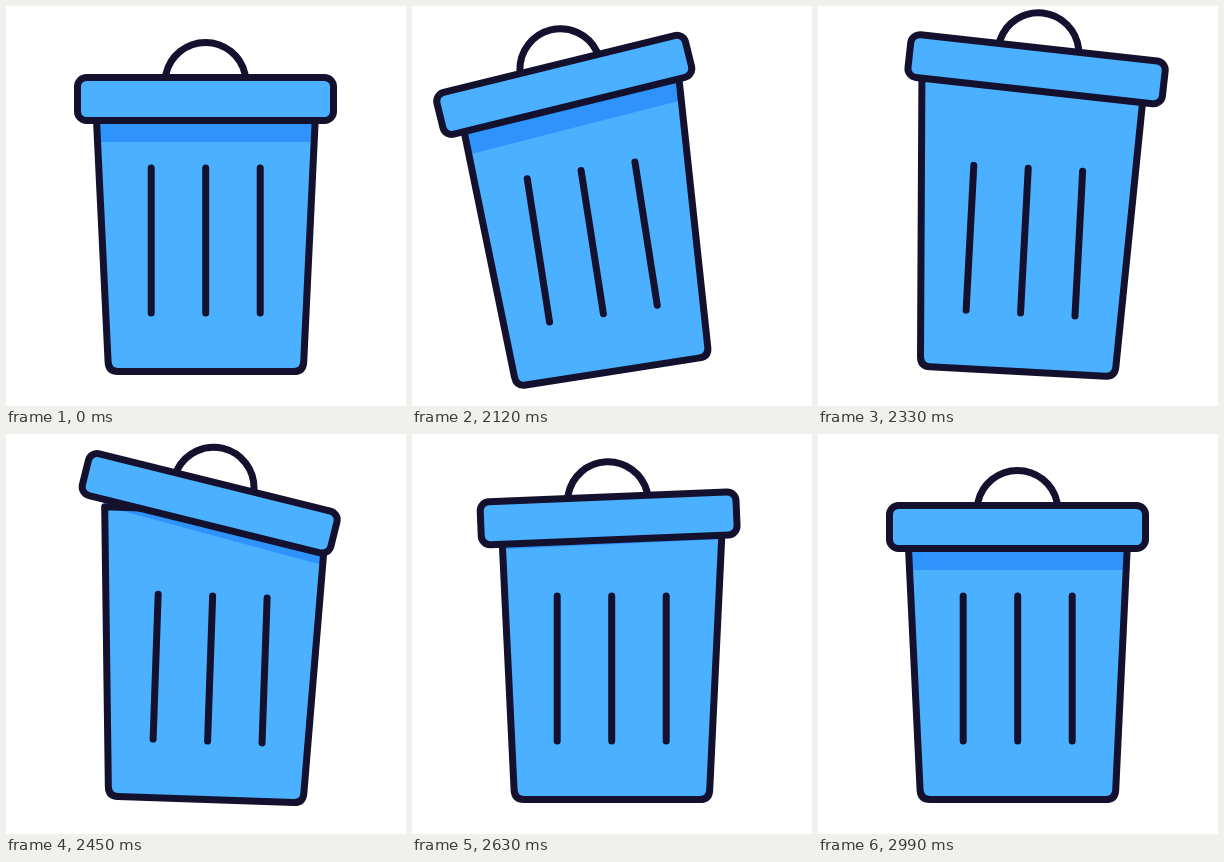
Write an HTML page that moves like this. It is 400 px wide and 400 px high and loops after 3.08 s.

```html
<!DOCTYPE html>
<html lang="en">
<head>
<meta charset="utf-8">
<title>Bin</title>
<style>
  html, body { margin: 0; height: 100%; overflow: hidden; background: #fff; }
  svg { display: block; width: 100vw; height: 100vh; }
</style>
</head>
<body>
<svg viewBox="0 0 400 400">
  <defs>
    <path id="shell" d="M88.7 76.5H311L297.7 356Q297.2 365.5 288 365.5H112Q102.6 365.5 102.1 356Z"/>
    <clipPath id="inside"><use href="#shell"/></clipPath>
  </defs>
  <g id="bin" fill="#4ab0ff" stroke="#14112f" stroke-width="7" stroke-linecap="round" stroke-linejoin="round">
    <use href="#shell" stroke="none"/>
    <g clip-path="url(#inside)">
      <rect id="shade" x="0" y="-64" width="400" height="200" fill="#2e93fc" stroke="none"/>
    </g>
    <use href="#shell" fill="none"/>
    <path d="M145.2 162V307M199.7 162V307M254.2 162V307" fill="none"/>
    <g id="lid">
      <path d="M160 68A40.5 40.5 0 0 1 239 68" fill="none"/>
      <rect x="71.5" y="71.5" width="256" height="43" rx="9"/>
    </g>
  </g>
</svg>
<script>
const LOOP = 3080, START = 2030, STEP = 30;
const [bin, lid, shade] = ["bin", "lid", "shade"].map(id => document.getElementById(id));

const ease = u => (1 - Math.cos(Math.PI * Math.min(1, Math.max(0, u)))) / 2;

// Swings from rest through the [time, value] peaks and back to rest at the end
function swing(t, begin, end, ...peaks) {
  let time = begin, value = 0, sum = 0;
  for (const [at, peak] of [...peaks, [end, 0]]) {
    sum += (peak - value) * ease((t - time) / (at - time));
    [time, value] = [at, peak];
  }
  return sum;
}

function place(node, x, y, angle, cx, cy) {
  node.setAttribute("transform", `translate(${x} ${y}) rotate(${angle} ${cx} ${cy})`);
}

function draw() {
  const now = performance.now() % LOOP;
  // The bin rests until START, then moves in even steps
  const t = now < START ? 0 : now - (now - START) % STEP;

  const tilt = swing(t, 1935, 2570, [2180, -10.3], [2350, 3.5]);
  const lidTilt = swing(t, 2010, 2900, [2200, -8], [2440, 12], [2650, -2.7]);
  const lidX = swing(t, 2000, 2800, [2200, -5], [2330, 3.3], [2450, -6]);
  const lidY = swing(t, 1950, 2830, [2260, -31.5]);
  const shadeY = swing(t, 2010, 2980, [2290, -52], [2460, -34]);

  place(bin, 0, 0, tilt, 200, 361);
  place(lid, lidX, lidY, lidTilt, 199.5, 93);
  place(shade, 0, shadeY, lidTilt * 1.1, 200, 136);
  requestAnimationFrame(draw);
}
draw();
</script>
</body>
</html>
```
